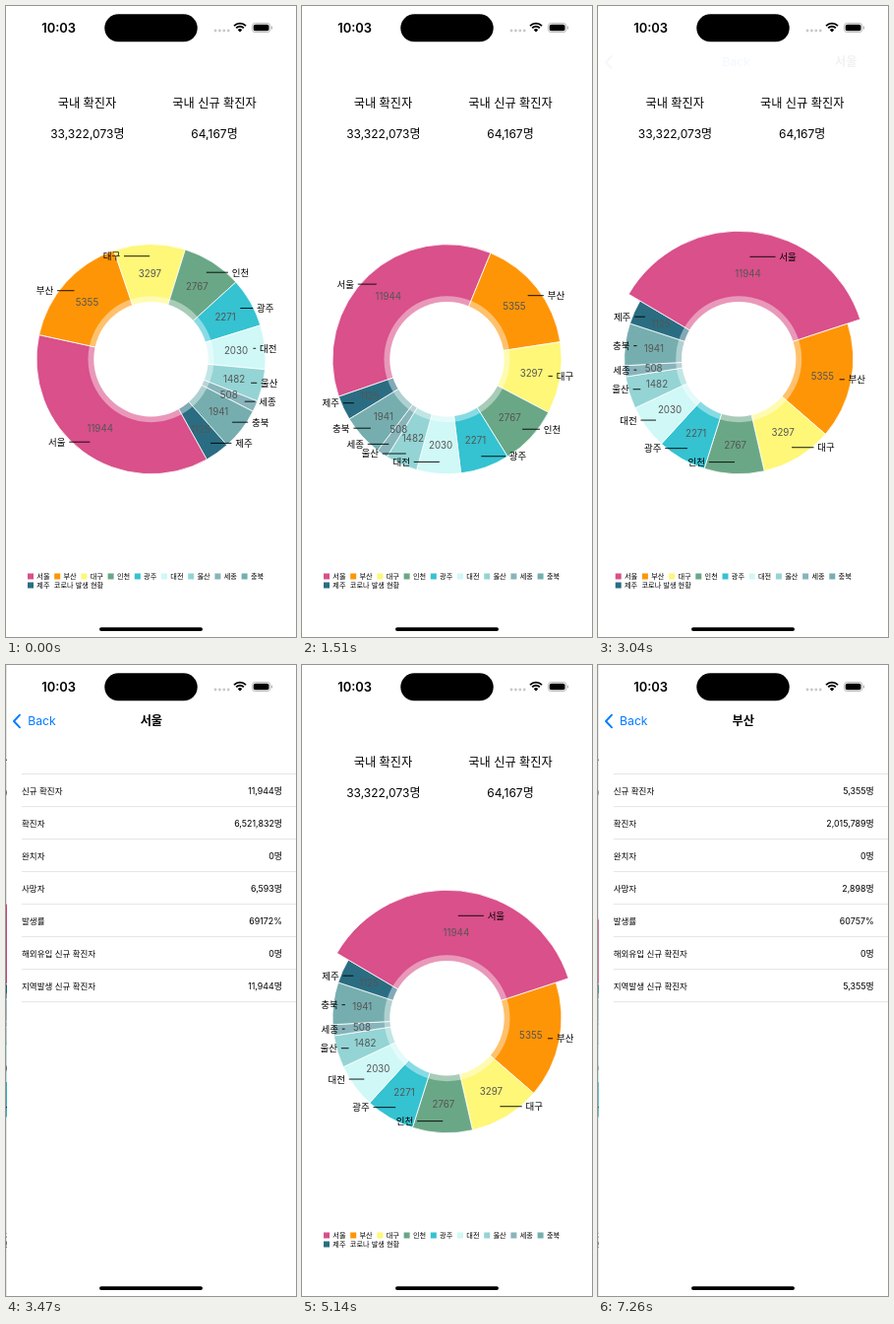
An HTML page that plays this animation: 295 by 640 pixels, repeating every 7.33 s.

```html
<!DOCTYPE html>
<html lang="ko">
<head>
<meta charset="utf-8">
<style>
  html, body { margin: 0; width: 100%; height: 100%; overflow: hidden; background: #fff; }
  svg { display: block; width: 100%; height: 100%; font-family: Inter, 'Noto Sans CJK KR', 'Noto Sans CJK', sans-serif; }
</style>
</head>
<body>
<svg id="stage" viewBox="0 0 295 640"></svg>
<script>
const LOOP = 7330, W = 295, CX = 147.5, CY = 358.2, R = 116.5, TAU = Math.PI * 2;

const cities = [
  ['서울', 11944, '#d9508a'], ['부산', 5355, '#fe9507'], ['대구', 3297, '#fef778'],
  ['인천', 2767, '#6aa786'], ['광주', 2271, '#35c2d1'], ['대전', 2030, '#cff8f6'],
  ['울산', 1482, '#94d4d4'], ['세종', 508, '#88b4bb'], ['충북', 1941, '#76aeaf'],
  ['제주', 1125, '#2a6d82']
];
const total = cities.reduce((sum, c) => sum + c[1], 0);

const rowNames = ['신규 확진자', '확진자', '완치자', '사망자', '발생률', '해외유입 신규 확진자', '지역발생 신규 확진자'];
const details = [
  ['11,944명', '6,521,832명', '0명', '6,593명', '69172%', '0명', '11,944명'],
  ['5,355명', '2,015,789명', '0명', '2,898명', '60757%', '0명', '5,355명']
];

// The picture advances in discrete steps: [first, last, count]
const bursts = [[550, 900, 4], [1020, 1230, 3], [1350, 1350, 1], [1510, 1960, 5], [2070, 2170, 2],
  [2270, 2790, 6], [3040, 3470, 5], [4590, 5140, 6], [6810, 7260, 5]];

function hold(t) {
  let last = 0;
  for (const [a, b, n] of bursts)
    for (let i = 0; i < n; i++) {
      const at = a + (b - a) * i / (n - 1 || 1);
      if (at <= t) last = at;
    }
  return last;
}

// Wheel angle: dragged by a finger, then slowed by friction
const drag = [[520, 60.8], [900, 108.4], [1350, 150], [1510, 161], [1800, 195.4]];

function wheelAngle(t) {
  if (t <= drag[0][0]) return drag[0][1];
  for (let i = 1; i < drag.length; i++) {
    const [t0, a0] = drag[i - 1], [t1, a1] = drag[i];
    if (t < t1) return a0 + (a1 - a0) * (t - t0) / (t1 - t0);
  }
  return 210.5 - 15.1 * Math.exp((1800 - t) / 158);
}

function spring(ms) {
  const x = ms * 0.0175;
  return 1 - (1 + x) * Math.exp(-x);
}

// 0 = chart page, 1 = detail page
function pushed(t) {
  if (t < 3040) return 0;
  if (t < 4590) return spring(t - 3020);
  if (t < 5140) return 1 - spring(t - 4570);
  return t < 6810 ? 0 : spring(t - 6790);
}

const fix = n => n.toFixed(2);
const rect = (x, y, w, h, fill, rx = 0) =>
  `<rect x="${x}" y="${y}" width="${w}" height="${h}" rx="${rx}" fill="${fill}"/>`;
const circle = (x, y, r, fill) => `<circle cx="${x}" cy="${y}" r="${r}" fill="${fill}"/>`;
const line = (x1, x2, y, stroke, w) =>
  `<path d="M${fix(x1)} ${fix(y)}H${fix(x2)}" stroke="${stroke}" stroke-width="${w}"/>`;
const group = (x, body, opacity = 1) =>
  `<g transform="translate(${fix(x)} 0)" opacity="${fix(opacity)}">${body}</g>`;

// y is the vertical middle of the glyphs
function text(str, x, y, size, anchor = 'start', fill = '#000', weight = 400) {
  return `<text x="${fix(x)}" y="${fix(y + size * 0.365)}" font-size="${size}" text-anchor="${anchor}" ` +
    `fill="${fill}" font-weight="${weight}">${str}</text>`;
}

function slice(a, b, r, fill) {
  const at = v => `${fix(CX + r * Math.cos(v))} ${fix(CY + r * Math.sin(v))}`;
  return `<path d="M${CX} ${CY}L${at(a)}A${r} ${r} 0 ${b - a > Math.PI ? 1 : 0} 1 ${at(b)}Z" ` +
    `fill="${fill}" stroke="#fff" stroke-width=".8"/>`;
}

function pie(angle, selected) {
  let a = angle * TAU / 360, slices = '', top = '', labels = '';
  cities.forEach(([name, value, color], i) => {
    const b = a + value / total * TAU, mid = (a + b) / 2;
    const cos = Math.cos(mid), sin = Math.sin(mid), side = cos < 0 ? -1 : 1;
    if (i === selected) top = slice(a, b, R + 13.5, color);
    else slices += slice(a, b, R, color);

    const x = CX + 104.5 * cos, y = CY + 104.5 * sin;
    const end = x + side * 26.2 * Math.abs(sin);
    labels += text(value, CX + 87 * cos, CY + 87 * sin, 9.75, 'middle', '#555') +
      line(x, end, y, '#000', 0.9) +
      text(name, end + side * 3.8, y, 9.5, side < 0 ? 'end' : 'start');
    a = b;
  });
  return slices + top + circle(CX, CY, 64, 'rgba(255,255,255,.41)') + circle(CX, CY, 58.2, '#fff') + labels;
}

function legend() {
  return cities.map(([name, , color], i) => {
    const x = 22 + i % 9 * 27.2, y = i < 9 ? 578.5 : 587.5;
    return rect(x, y - 3, 6, 6, color) + text(name, x + 9.3, y, 7.2);
  }).join('') + text('코로나 발생 현황', 48.8, 587.5, 7.2);
}

function chartPage(t) {
  const selected = t < 3040 ? -1 : t < 6810 ? 0 : 1;
  return text('국내 확진자', 82.5, 99, 12.2, 'middle') +
    text('33,322,073명', 82.8, 129.5, 12, 'middle') +
    text('국내 신규 확진자', 212, 99, 12.2, 'middle') +
    text('64,167명', 212, 129.5, 12, 'middle') +
    pie(wheelAngle(t), selected) + legend();
}

function detailPage(city) {
  let body = rect(0, 0, W, 640, '#fff') + line(15, W, 110.5, '#dedede', 0.8);
  rowNames.forEach((name, i) => {
    const y = 127.4 + i * 33;
    body += text(name, 15, y, 8.5) + text(details[city][i], 280, y, 8.9, 'end') +
      line(15, W, y + 16.2, '#dedede', 0.8);
  });
  return body;
}

function navBar(city, p) {
  const blue = '#007aff', slide = 110 * (1 - p);
  return group(0, `<path d="M14 50.7L8 57L14 63.3" fill="none" stroke="${blue}" stroke-width="1.9" stroke-linecap="round" stroke-linejoin="round"/>`, p) +
    group(slide, text('Back', 21.8, 57, 12.2, 'start', blue) +
      text(cities[city][0], CX, 57, 12.2, 'middle', '#000', 600), p);
}

function statusBar() {
  const arc = r => {
    const d = r * 0.72;
    return `<path d="M${238 - d} ${26.2 - d}A${r} ${r} 0 0 1 ${238 + d} ${26.2 - d}" fill="none" stroke="#000" stroke-width="1.8"/>`;
  };
  return text('10:03', 53.7, 22, 12.9, 'middle', '#000', 600) +
    rect(100.3, 8.3, 94.4, 28, '#000', 14) +
    [213, 217.4, 221.8, 226.2].map(x => circle(x, 25, 1.4, '#c8c8c8')).join('') +
    arc(8.3) + arc(5.3) + '<path d="M238 26.6L235.8 24.2A3.1 3.1 0 0 1 240.2 24.2Z"/>' +
    '<rect x="250.4" y="17.4" width="18.4" height="9.2" rx="3" fill="none" stroke="#aaa" stroke-width=".8"/>' +
    rect(251.7, 18.7, 15.8, 6.6, '#000', 1.9) + rect(269.8, 20.5, 1.1, 3, '#aaa', 0.5) +
    rect(95, 630.2, 105, 3.8, '#000', 1.9);
}

function scene(t) {
  const p = pushed(t), city = t < 6000 ? 0 : 1;
  let body = group(-0.3 * W * p, chartPage(t));
  if (p > 0) {
    body += rect(0, 0, W, 640, `rgba(0,0,0,${fix(0.1 * p)})`) +
      group(W * (1 - p), detailPage(city)) + navBar(city, p);
  }
  return body + statusBar();
}

const stage = document.getElementById('stage');
const start = performance.now();
let shown = -1;

function draw() {
  const t = hold((performance.now() - start) % LOOP);
  if (t !== shown) stage.innerHTML = scene(shown = t);
  requestAnimationFrame(draw);
}
draw();
</script>
</body>
</html>
```
